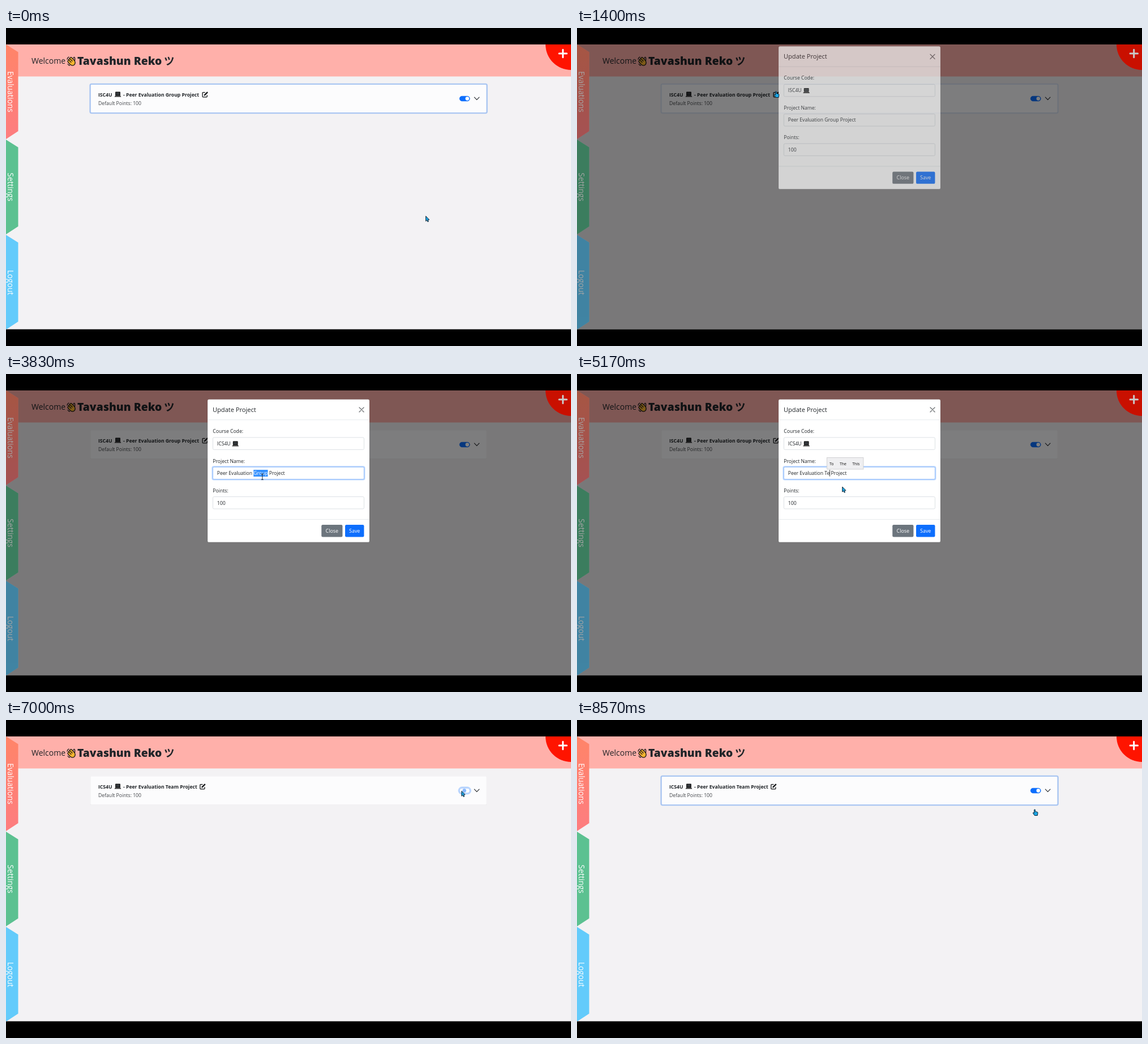
An HTML page that plays this animation: 998 px wide and 561 px high, repeating every 8610 ms.

```html
<!DOCTYPE html>
<html lang="en">
<head>
<meta charset="utf-8">
<title>Update Project</title>
<style>
  html, body { margin: 0; width: 100%; height: 100%; overflow: hidden; background: #000; }
  svg { display: block; width: 998px; height: 561px; }
  text { font-family: "Open Sans", "Noto Sans", sans-serif; font-size: 8.63px; fill: #212529; white-space: pre; }
  .tab { font-size: 13.6px; font-weight: 500; fill: #fff; text-anchor: middle; }
  .bold { font-weight: 700; }
  .btn { font-size: 8.9px; fill: #fff; text-anchor: middle; }
  .hint { font-size: 6.9px; fill: #111; }
  .field { fill: #fff; stroke: #ced4da; stroke-width: .7; }
  .ring { fill: none; stroke: #0d6efd; stroke-opacity: .27; stroke-width: 2.4; }
</style>
</head>
<body>
<svg viewBox="0 0 998 561">
  <defs>
    <clipPath id="screen"><rect y="29" width="998" height="502.5"/></clipPath>
    <linearGradient id="coral" x2="0" y2="1"><stop stop-color="#ff8468"/><stop offset="1" stop-color="#fd7d80"/></linearGradient>
    <g id="laptop">
      <rect x="1.6" y=".6" width="8.8" height="6.6" rx=".8" fill="#111"/>
      <rect x="2.8" y="1.7" width="6.4" height="4.3" fill="#33373b"/>
      <path d="M1.6 7.2H10.4L12 9.6H0Z" fill="#222"/>
      <path d="M2.4 8.1H9.6" stroke="#777" stroke-width=".5"/>
    </g>
    <path id="tabShape" d="M0 0L21.5 13.5V153L0 167Z"/>
  </defs>
  <rect width="998" height="561"/>
  <g clip-path="url(#screen)">
    <rect y="29" width="998" height="503" fill="#f3f2f4"/>
    <rect y="29" width="998" height="56.5" fill="#ffb0aa"/>
    <text x="45" y="63" style="font-size:14px;font-weight:500">Welcome</text>
    <g transform="translate(107 50)" stroke="#1c1a16" stroke-linejoin="round" stroke-linecap="round">
      <path d="M3 6.5L6.5 2.2Q7.8 1 9 2.2L14 7.5Q16.5 12 13.5 15Q10 17.5 6.5 14.5L2.5 10Q1.6 8.6 3 6.5Z" fill="#fbb52f" stroke-width="1.3"/>
      <path d="M4 6.5L8 10.6M6 4.2L10 8.2M1 5.2Q1.4 2.3 4 1.2M12.2 3.4L12.8 1.6Q14.3 1 14.6 3V7.6M2.2 13.4Q3 15.6 5.4 16" fill="none" stroke-width="1.3"/>
    </g>
    <text x="126" y="65" style="font-size:19.3px;font-weight:800">Tavashun Reko</text>
    <text x="279" y="65" style="font:700 18.5px 'Noto Sans CJK JP','Noto Sans CJK',sans-serif">ツ</text>

    <rect x="149" y="100" width="700" height="50" rx="2" fill="#000" opacity=".06"/>
    <rect x="149.3" y="99.5" width="699.5" height="50" rx="2" fill="#fcfcfd"/>
    <rect id="cardRing" x="148.6" y="98.9" width="701" height="51.2" rx="2.5" fill="none" stroke="#aac6f2" stroke-width="2.4"/>
    <text id="code" class="bold" x="163" y="120.5"></text>
    <use href="#laptop" x="191.5" y="112"/>
    <text id="title" class="bold" x="207" y="120.5"></text>
    <g id="pen" fill="none" stroke="#151719">
      <path d="M5.5 1.9H1.9Q.8 1.9 .8 3V9Q.8 10 1.9 10H7.9Q8.9 10 8.9 9V6.4" stroke-width="1.3"/>
      <path d="M4.2 6.8L9.8 1.3" stroke-width="2.3"/>
      <path d="M3.3 7.9L3.7 5.9L5.4 7.5Z" fill="#151719" stroke="none"/>
    </g>
    <text x="163" y="136" fill-opacity=".85">Default Points: 100</text>
    <rect id="switchRing" class="ring" x="799.7" y="118.8" width="21" height="11.6" rx="5.8"/>
    <rect id="track" x="801.2" y="120.3" width="18" height="8.6" rx="4.3" stroke-width=".7"/>
    <circle id="knob" cy="124.6" r="3.3"/>
    <path d="M827.3 122.2L831.6 126.7L835.9 122.2" fill="none" stroke="#212529" stroke-width="1.1" stroke-linecap="round" stroke-linejoin="round"/>
    <rect id="dimPage" y="29" width="998" height="503"/>

    <use href="#tabShape" y="29" fill="url(#coral)"/>
    <use href="#tabShape" y="197" fill="#5cc191"/>
    <use href="#tabShape" y="365" fill="#63cbfb"/>
    <text class="tab" transform="translate(3 112.5) rotate(90)">Evaluations</text>
    <text class="tab" transform="translate(3 280.5) rotate(90)">Settings</text>
    <text class="tab" transform="translate(3 449) rotate(90)">Logout</text>
    <g id="dimTabs">
      <use href="#tabShape" y="29"/><use href="#tabShape" y="197"/><use href="#tabShape" y="365"/>
    </g>
    <circle cx="998" cy="29" r="45" fill="#ff1400"/>
    <path d="M977 45H990.5M983.7 38.2V51.8" stroke="#fff" stroke-width="3" stroke-linecap="round"/>
    <circle id="dimPlus" cx="998" cy="29" r="45"/>

    <g id="modal">
      <rect x="356" y="44.8" width="286" height="252" rx="2.6" fill="#fff" stroke="#000" stroke-opacity=".2" stroke-width=".6"/>
      <path d="M356 80.8H642M356 256.5H642" stroke="#dee2e6" stroke-width=".7"/>
      <text x="365" y="67" style="font-size:11.1px;font-weight:500">Update Project</text>
      <path d="M624 59L632 67M632 59L624 67" stroke="#6f7275" stroke-width="1.3" stroke-linecap="round"/>
      <text x="365.3" y="104">Course Code:</text>
      <text x="365.3" y="157">Project Name:</text>
      <text x="365.3" y="209">Points:</text>
      <rect class="field" x="365.4" y="112" width="267" height="21.4" rx="2"/>
      <rect class="field" x="365.4" y="164.2" width="267" height="21.4" rx="2"/>
      <rect class="field" x="365.4" y="216.5" width="267" height="21.4" rx="2"/>
      <g id="focus">
        <rect class="ring" x="364.6" width="268.6" height="23" y="-.8" rx="2.4"/>
        <rect x="365.4" width="267" height="21.4" rx="2" fill="#fff" stroke="#86b7fe" stroke-width=".8"/>
      </g>
      <rect id="mark" y="169" height="12" fill="#3390ff"/>
      <text id="codeIn" x="372.8" y="126"></text>
      <use id="codeIcon" href="#laptop" y="118"/>
      <text id="nameIn" x="372.8" y="178" style="font-size:8.58px"></text>
      <text x="372.8" y="230.5">100</text>
      <rect id="caret" width=".8" height="11.5" fill="#111"/>
      <rect x="557.2" y="266" width="37.2" height="21.4" rx="2.2" fill="#6c757d"/>
      <rect x="599" y="266" width="33.4" height="21.4" rx="2.2" fill="#0d6efd"/>
      <text class="btn" x="575.8" y="280">Close</text>
      <text class="btn" x="615.7" y="280">Save</text>
      <g id="hints">
        <rect x="441.3" y="147.6" width="64.6" height="20.4" fill="#efeff1" stroke="#c8c8ca" stroke-width=".8"/>
        <text class="hint" x="446" y="160.5">To</text>
        <text class="hint" x="464" y="160.5">The</text>
        <text class="hint" x="486.2" y="160.5">This</text>
      </g>
    </g>
  </g>
  <g id="pointer" stroke-linejoin="round">
    <path id="arrow" d="M0 0V9L2 7.3L3.4 10.2L4.9 9.5L3.6 6.7L6.2 6.4Z" fill="#1ba7e6" stroke="#0b1622" stroke-width=".9"/>
    <path id="hand" d="M0 .8Q.9 -.4 1.8 .8V4L5.4 4.8Q6.6 5.2 6.4 6.6L5.7 11H.7L-2 7.2Q-2.6 5.8 -1.2 5.8L0 6.8Z" fill="#1ba7e6" stroke="#0b1622" stroke-width=".9"/>
    <path id="beam" d="M-2 -5H2M0 -5V5M-2 5H2" stroke="#0b1622" stroke-width=".9" fill="none"/>
  </g>
</svg>
<script>
const LOOP = 8610;
const el = {};
document.querySelectorAll('[id]').forEach(n => el[n.id] = n);

const set = (n, attrs) => { for (const k in attrs) n.setAttribute(k, attrs[k]); };
const show = (n, on) => n.setAttribute('visibility', on ? 'inherit' : 'hidden');
const ramp = (t, from, ms) => Math.min(1, Math.max(0, (t - from) / ms));
const pulse = (t, on, off, ms = 150) => ramp(t, on, ms) - ramp(t, off, ms);
const easeOut = p => 1 - (1 - p) ** 2;
const smooth = p => p * p * (3 - 2 * p);
const within = (t, a, b) => t >= a && t < b;
// last entry whose start time has passed
const at = (list, t) => list.filter(e => e[0] <= t).pop();
const mix = (a, b, p) => `rgb(${a.map((v, i) => Math.round(v + (b[i] - v) * p))})`;

const fill = (n, html) => {
  if (n.html !== html) n.innerHTML = n.html = html;
};

const OPEN = 1150, SAVE = 6070, OFF = 6950, ON = 7290, CARD = 7900;

// time, x, y
const path = [
  [0, 741.5, 331.8], [30, 741.5, 331.8], [870, 350.5, 111.5], [1640, 350.5, 111.5],
  [1850, 381, 124], [1950, 381, 124], [2220, 353.7, 137.8], [3000, 353.7, 137.8],
  [3480, 448, 176], [3700, 448, 176], [4120, 468.7, 199], [5500, 468.7, 199],
  [5960, 609.6, 277.8], [6400, 609.6, 277.8], [6850, 804.8, 125.3], [8250, 804.8, 125.3],
  [8570, 807.6, 157.5], [8610, 807.6, 157.5]
];
const shapes = [
  [0, 'arrow'], [810, 'hand'], [1700, 'arrow'], [1790, 'beam'], [2080, 'arrow'], [3230, 'beam'],
  [3950, 'arrow'], [5860, 'hand'], [6200, 'arrow'], [8230, 'hand']
];
// time, text, caret index
const codeSteps = [[0, 'ISC4U', 3], [2200, 'IS4U', 2], [2640, 'IS4U', 1], [2830, 'ICS4U', 2]];
const head = 'Peer Evaluation ';
const nameSteps = [
  [0, 'Group', 5], [4620, 'T', 1], [4990, 'Te', 2], [5270, 'Tea', 3], [5430, 'Team', 4]
];

function movePointer(t) {
  const i = Math.max(1, path.findIndex(k => k[0] > t));
  const [a, b] = [path[i - 1], path[i]];
  const p = smooth(ramp(t, a[0], b[0] - a[0]));
  const x = a[1] + (b[1] - a[1]) * p, y = a[2] + (b[2] - a[2]) * p;
  set(el.pointer, { transform: `translate(${x} ${y})` });
  const shape = at(shapes, t)[1];
  for (const s of ['arrow', 'hand', 'beam']) show(el[s], s === shape);
}

function drawCard(t) {
  const saved = t >= SAVE + 150;
  fill(el.code, saved ? 'ICS4U' : 'ISC4U');
  fill(el.title, `- Peer Evaluation ${saved ? 'Team' : 'Group'} Project`);
  set(el.pen, { transform: `translate(${saved ? 342 : 346.3} 111.8)` });
  set(el.cardRing, { opacity: 1 - ramp(t, OPEN + 150, 150) + ramp(t, CARD, 150) });

  const off = pulse(t, OFF, ON);
  const checked = t < OFF || t >= ON;
  const glow = pulse(t, OFF - 60, CARD, 60);
  set(el.switchRing, { opacity: glow });
  set(el.track, {
    fill: checked ? '#0d6efd' : '#fff',
    stroke: checked ? '#0d6efd' : mix([191, 191, 191], [134, 183, 254], glow)
  });
  set(el.knob, { cx: 814.8 - 9.2 * easeOut(off), fill: checked ? '#fff' : '#86b7fe' });
}

function drawModal(t) {
  const dim = .5 * pulse(t, OPEN, SAVE + 150);
  set(el.dimPage, { opacity: dim });
  set(el.dimTabs, { opacity: dim * .7 });
  set(el.dimPlus, { opacity: dim * .42 });

  const fade = pulse(t, OPEN + 150, SAVE);
  const drop = easeOut(ramp(t, OPEN + 150, 300)) - easeOut(ramp(t, SAVE, 300));
  show(el.modal, fade > 0);
  set(el.modal, { opacity: fade, transform: `translate(0 ${-28.5 * (1 - drop)})` });

  const code = at(codeSteps, t), name = at(nameSteps, t);
  const picked = within(t, 3600, 4620);
  const word = picked ? `<tspan fill="#fff">${name[1]}</tspan>` : name[1];
  fill(el.codeIn, code[1]);
  fill(el.nameIn, `${head}${word} Project`);
  set(el.codeIcon, { x: 372.8 + el.codeIn.getComputedTextLength() + 2.6 });

  const nameX = n => 372.8 + el.nameIn.getSubStringLength(0, n);
  const start = nameX(head.length);
  show(el.mark, picked);
  set(el.mark, { x: start, width: nameX(head.length + 5) - start });

  const inName = t >= 3450;
  const focused = within(t, 1900, SAVE);
  show(el.focus, focused);
  set(el.focus, { transform: `translate(0 ${inName ? 164.2 : 112})` });
  const last = Math.max(inName ? 3450 : 1900, (inName ? name : code)[0]);
  show(el.caret, focused && !picked && (t - last) % 1060 < 530);
  set(el.caret, {
    x: inName ? nameX(head.length + name[2]) : 372.8 + el.codeIn.getSubStringLength(0, code[2]),
    y: inName ? 169.2 : 117
  });
  show(el.hints, within(t, 4700, 5560));
}

function draw(t) {
  drawCard(t);
  drawModal(t);
  movePointer(t);
}

const begin = performance.now();
function tick() {
  draw((performance.now() - begin) % LOOP);
  requestAnimationFrame(tick);
}
draw(0);
requestAnimationFrame(tick);
</script>
</body>
</html>
```
